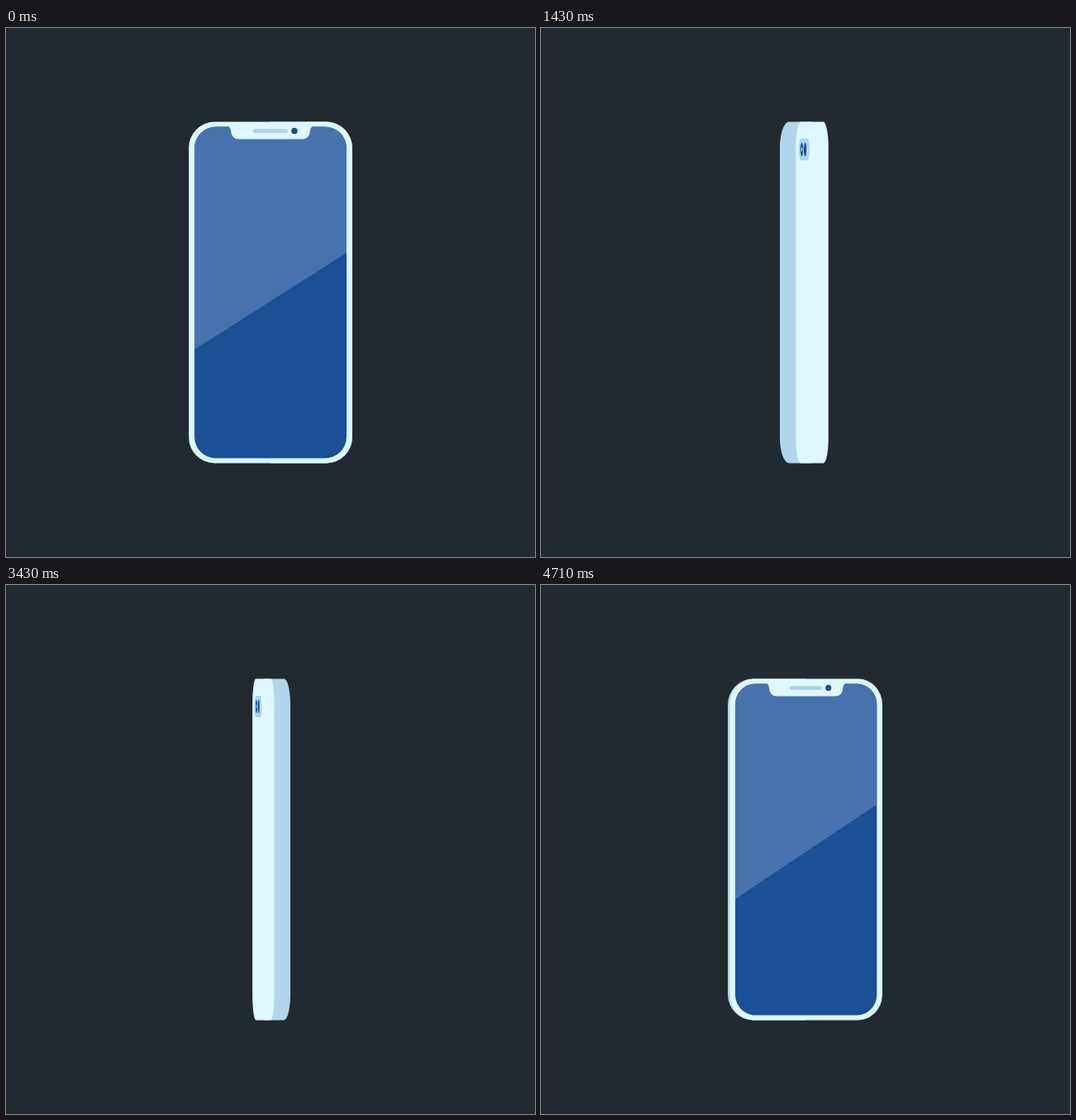
Write an HTML page that moves like this. It is 640 px wide and 640 px high and loops after 4.78 s.

```html
<!DOCTYPE html>
<html lang="en">
<head>
<meta charset="utf-8">
<title>Turning phone</title>
<style>
  html, body { margin: 0; width: 100%; height: 100%; overflow: hidden; background: #222a31; }
  svg { display: block; width: 100%; height: 100%; }
  .body { fill: #dff8ff; }
  .edge { fill: #b3d5eb; }
  .dark { fill: #1b4f96; }
  .glare { fill: #4872ad; }
  .soft { fill: #a9d4ec; }
</style>
</head>
<body>
<svg viewBox="0 0 640 640">
  <defs>
    <clipPath id="screen"><rect x="-92" y="119.5" width="184" height="401" rx="26"/></clipPath>
  </defs>
  <path id="edge" class="edge"/>
  <g id="front">
    <rect class="body" x="-98.8" y="113.6" width="197.6" height="412.8" rx="31"/>
    <g clip-path="url(#screen)">
      <rect class="dark" x="-92" y="119" width="184" height="402"/>
      <path id="glare" class="glare"/>
    </g>
    <path class="body" d="M-52 118.5L-50 119.5Q-48.5 120.5-48 124Q-47 134.6-38 134.6H38Q47 134.6 48 124Q48.5 120.5 50 119.5L52 118.5Z"/>
    <rect class="soft" x="-21" y="122.3" width="42" height="4.7" rx="2.3"/>
    <circle class="dark" cx="29" cy="124.5" r="3.8"/>
  </g>
  <g id="back">
    <rect class="body" x="-98.8" y="113.6" width="197.6" height="412.8" rx="31"/>
    <rect class="soft" x="-80.5" y="134" width="65.5" height="26" rx="13"/>
    <circle class="dark" cx="-62.5" cy="147" r="8.2"/>
    <circle class="body" cx="-62.5" cy="147" r="3"/>
    <circle class="dark" cx="-42" cy="147" r="8.2"/>
    <circle class="body" cx="-26.5" cy="147" r="3.3"/>
  </g>
</svg>
<script>
  const LOOP = 4780, STEPS = 67;
  const QUARTER = 30, TICKS_PER_STEP = 25 / 14;
  const $ = id => document.getElementById(id);
  const edge = $('edge'), front = $('front'), back = $('back'), glare = $('glare');

  // Straight from a to b to c as p goes 0, 0.5, 1.
  const bend = (p, a, b, c) => p < 0.5 ? a + (b - a) * 2 * p : b + (c - b) * (2 * p - 1);

  function pose(step) {
    const tick = Math.ceil(step * TICKS_PER_STEP - 1e-6);
    const q = Math.floor(tick / QUARTER);
    const u = tick / QUARTER - q;
    const p = q % 2 ? 1 - u : u;      // 0 flat, 1 edge-on
    const dir = q % 2 ? -1 : 1;       // side on which the edge shows
    const isFront = q === 0 || q === 3;
    const shift = -10 * p;

    const far = bend(p, 98.8, 62.5, 10);
    const rx = bend(p, 31, 26, 1);
    edge.setAttribute('d', `M${shift} 113.6H${far - rx}A${rx} 31 0 0 1 ${far} 144.6` +
      `V495.4A${rx} 31 0 0 1 ${far - rx} 526.4H${shift}Z`);
    edge.setAttribute('transform', `translate(320) scale(${dir} 1)`);

    const face = isFront ? front : back;
    front.style.display = isFront ? '' : 'none';
    back.style.display = isFront ? 'none' : '';
    face.setAttribute('transform', `translate(${320 + dir * shift}) scale(${1 - p} 1)`);
    glare.setAttribute('d', `M-92 119H92V${272 - 97 * p}L-92 ${389 - 133 * p}Z`);
  }

  const start = performance.now();
  function draw(now) {
    const t = Math.max(0, now - start) % LOOP;
    pose(Math.min(STEPS - 1, Math.floor(t / LOOP * STEPS + 0.05)));
    requestAnimationFrame(draw);
  }
  pose(0);
  requestAnimationFrame(draw);
</script>
</body>
</html>
```
